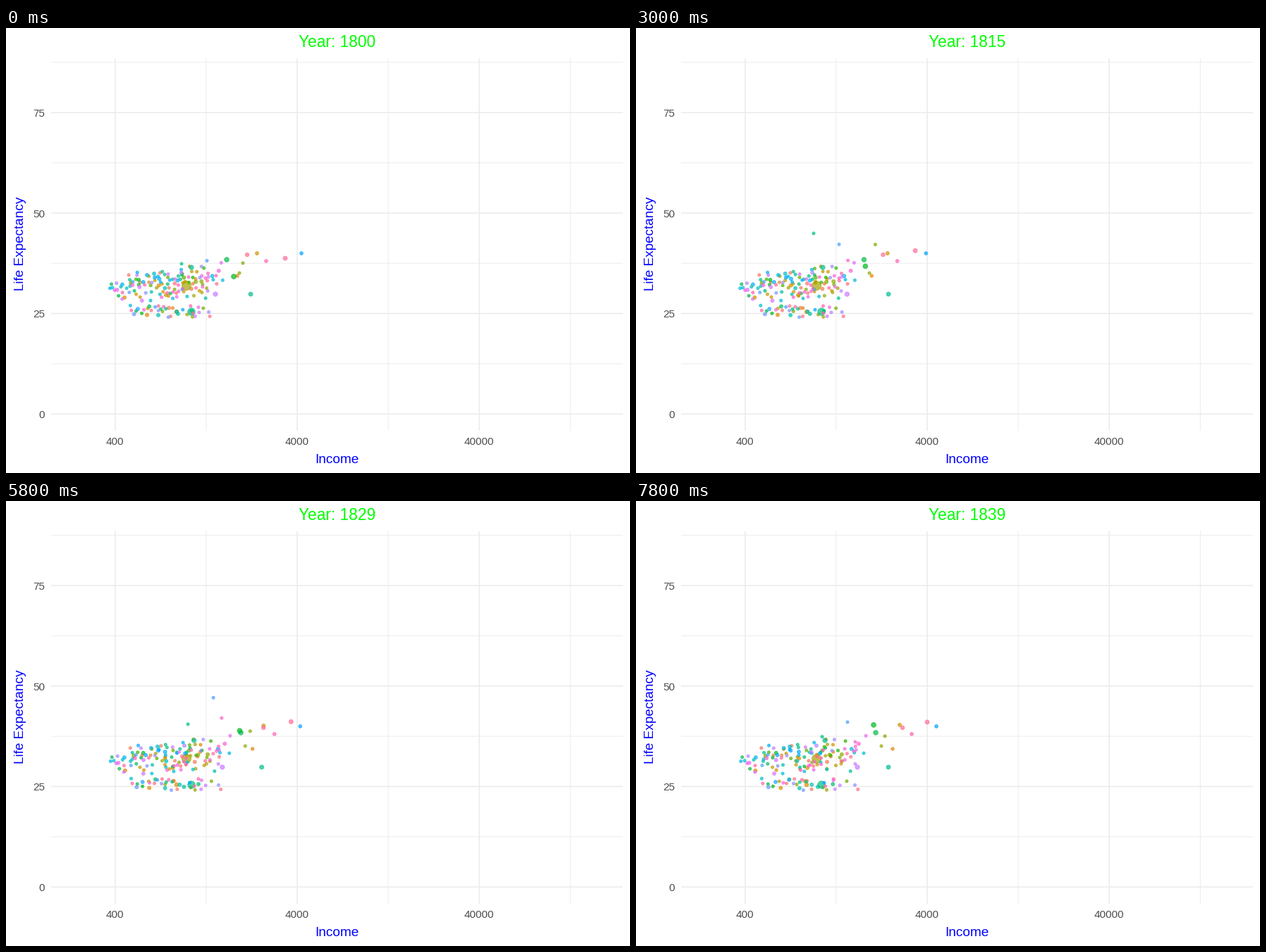
A matplotlib script for the animation above (8 s loop, 885 by 632 pixels).

```python
import numpy as np
import matplotlib.pyplot as plt
from matplotlib.animation import FuncAnimation

W, H, DPI = 885, 632, 100
YEARS = 40
PX = 72 / DPI  # points per pixel
LEFT, RIGHT, TOP, BOTTOM = 64, 875, 43, 572
SMALL = 2.1  # radius of a small country
plt.rcParams["font.family"] = "Liberation Sans"

t = np.arange(YEARS)
growth = (t / t[-1]) ** 1.7

# Rich or large countries: hue, radius, evenly timed points of the path
LEADERS = [
    (245, 2.4, [(419, 320), (409, 320), (426, 320)]),
    (357, 3.0, [(396, 327), (396, 313), (413, 314)]),
    (360, 2.8, [(342, 322), (353, 322), (378, 322)]),
    (139, 3.3, [(313, 329), (340, 329)]),
    (130, 3.4, [(323, 353), (326, 334), (337, 318)]),
    (167, 3.0, [(347, 378), (357, 378), (364, 378), (358, 378)]),
    (85, 6.5, [(256, 366), (256, 366)]),
    (285, 3.2, [(297, 378), (300, 378), (314, 378)]),
    (170, 3.2, [(263, 340), (268, 340)]),
    (45, 2.9, [(242, 403), (242, 403)]),
    (60, 2.5, [(356, 320), (357, 320), (374, 318)]),
    (342, 2.4, [(369, 331), (371, 331), (391, 331)]),
    (95, SMALL, [(331, 348), (331, 348), (348, 348)]),
    (38, 2.3, [(328, 352), (336, 352), (364, 352)]),
]

# Good or bad spells: hue, radius, x, drift, y, rise, peak year, duration
SPELLS = [
    (163, SMALL, 249, 15, 335, 64, 20, 8),
    (252, SMALL, 285, 15, 331, 55, 26, 12),
    (335, SMALL, 298, 13, 352, 50, 25, 11),
    (105, SMALL, 336, 17, 334, 34, 19, 8),
    (118, SMALL, 250, 17, 349, 31, 21, 5),
    (161, 5.3, 263, 0, 403, -24, 33, 1.1),
    (330, SMALL, 237, 10, 375, -170, 18.7, 1),
    (200, SMALL, 250, 12, 371, -105, 8, 0.8),
]


def hcl(hue, chroma=100, lum=65):
    """Polar LUV colours as clipped sRGB rows."""
    a = np.radians(hue)
    y = ((lum + 16) / 116) ** 3
    u = chroma * np.cos(a) / (13 * lum) + 0.1978398
    v = chroma * np.sin(a) / (13 * lum) + 0.4683363
    x = 9 * y * u / (4 * v)
    z = -x / 3 - 5 * y + 3 * y / v
    lin = np.stack([3.240479 * x - 1.537150 * y - 0.498535 * z,
                    -0.969256 * x + 1.875992 * y + 0.041556 * z,
                    0.055648 * x - 0.204043 * y + 1.057311 * z], axis=1)
    lin = np.clip(lin, 0, 1)
    return np.where(lin > 0.00304, 1.055 * lin ** (1 / 2.4) - 0.055, 12.92 * lin)


def leader_path(points):
    times = np.linspace(0, t[-1], len(points))
    return np.column_stack([np.interp(t, times, axis) for axis in zip(*points)])


def spell_path(x, drift, y, rise, peak, duration):
    bump = np.exp(-((t - peak) / duration) ** 2)
    return np.column_stack([x + drift * growth, y - rise * bump])


def scatter_spots(rng, count):
    """A sloping main cloud with a thin band below it, evenly spaced."""
    spots = []
    while len(spots) < count:
        if rng.random() < 0.8:
            x = 139 + 178 * rng.beta(1.9, 2.2)
            y = 371 - 0.1 * (x - 165) + rng.normal(0, 12)
            inside = 353 - 0.14 * (x - 140) < y < 388
        else:
            x, y = rng.uniform(172, 292), rng.normal(402, 4.5)
            inside = 394 < y < 412
        if inside and all(np.hypot(x - p, y - q) > 3.2 for p, q in spots):
            spots.append((x, y))
    return spots


def crowd(count=158, seed=4):
    """Poor countries: level life expectancy, slowly growing income."""
    rng = np.random.default_rng(seed)
    hues = np.linspace(15, 375, count, endpoint=False)
    for hue, (x, y) in zip(hues, scatter_spots(rng, count)):
        drift = rng.uniform(0.2, 1.8) * (3 + 0.08 * (x - 140))
        path = np.column_stack([x + drift * growth, np.full(YEARS, y)])
        yield hue, SMALL + 0.4 * (rng.random() < 0.25), path


def build():
    """Hues, radii and positions (dot, year, xy), sorted by hue."""
    rows = [(hue, r, leader_path(points)) for hue, r, points in LEADERS]
    rows += [(hue, r, spell_path(*rest)) for hue, r, *rest in SPELLS]
    rows += crowd()
    rows.sort(key=lambda row: row[0])
    return [np.array(column) for column in zip(*rows)]


fig = plt.figure(figsize=(W / DPI, H / DPI), dpi=DPI, facecolor="white")
ax = fig.add_axes([0, 0, 1, 1])
ax.set_xlim(0, W)
ax.set_ylim(H, 0)
ax.axis("off")


def grid(xs, ys, width):
    style = dict(color="#EBEBEB", linewidths=width * PX, snap=False, zorder=1)
    ax.vlines(xs, TOP, BOTTOM, **style)
    ax.hlines(ys, LEFT, RIGHT, **style)


def label(x, y, text, size, color, **kw):
    opts = dict(ha="center", va="baseline") | kw
    return ax.text(x, y, text, fontsize=size * PX, color=color, **opts)


major_x = 154.8 + 258.2 * np.arange(3)
major_y = 548.2 - 142.7 * np.arange(4)
grid(major_x + 129.1, major_y - 71.3, 0.9)
grid(major_x, major_y, 1.5)
for i, x in enumerate(major_x):
    label(x - 0.3, 592, str(400 * 10 ** i), 15.2, "#4D4D4D")
for i, y in enumerate(major_y):
    label(55, y + 5.8, str(25 * i), 15.2, "#4D4D4D", ha="right")

label(469, 617.5, "Income", 19, "#0000FF")
label(25, 306.5, "Life Expectancy", 19, "#0000FF",
      rotation=90, rotation_mode="anchor")
title = label(469.5, 27, "", 22.8, "#00FF00")

hues, radii, paths = build()
rgba = np.column_stack([hcl(hues), np.full(len(hues), 0.7)])
dots = ax.scatter(*paths[:, 0].T, s=(2 * radii * PX) ** 2, facecolors=rgba,
                  edgecolors=rgba, linewidths=0.8 * PX, zorder=2)


def draw(year):
    dots.set_offsets(paths[:, year])
    title.set_text(f"Year: {1800 + year}")
    return dots, title


anim = FuncAnimation(fig, draw, frames=YEARS, interval=200,
                     init_func=lambda: draw(0), repeat=True, repeat_delay=0)
plt.show()
```
